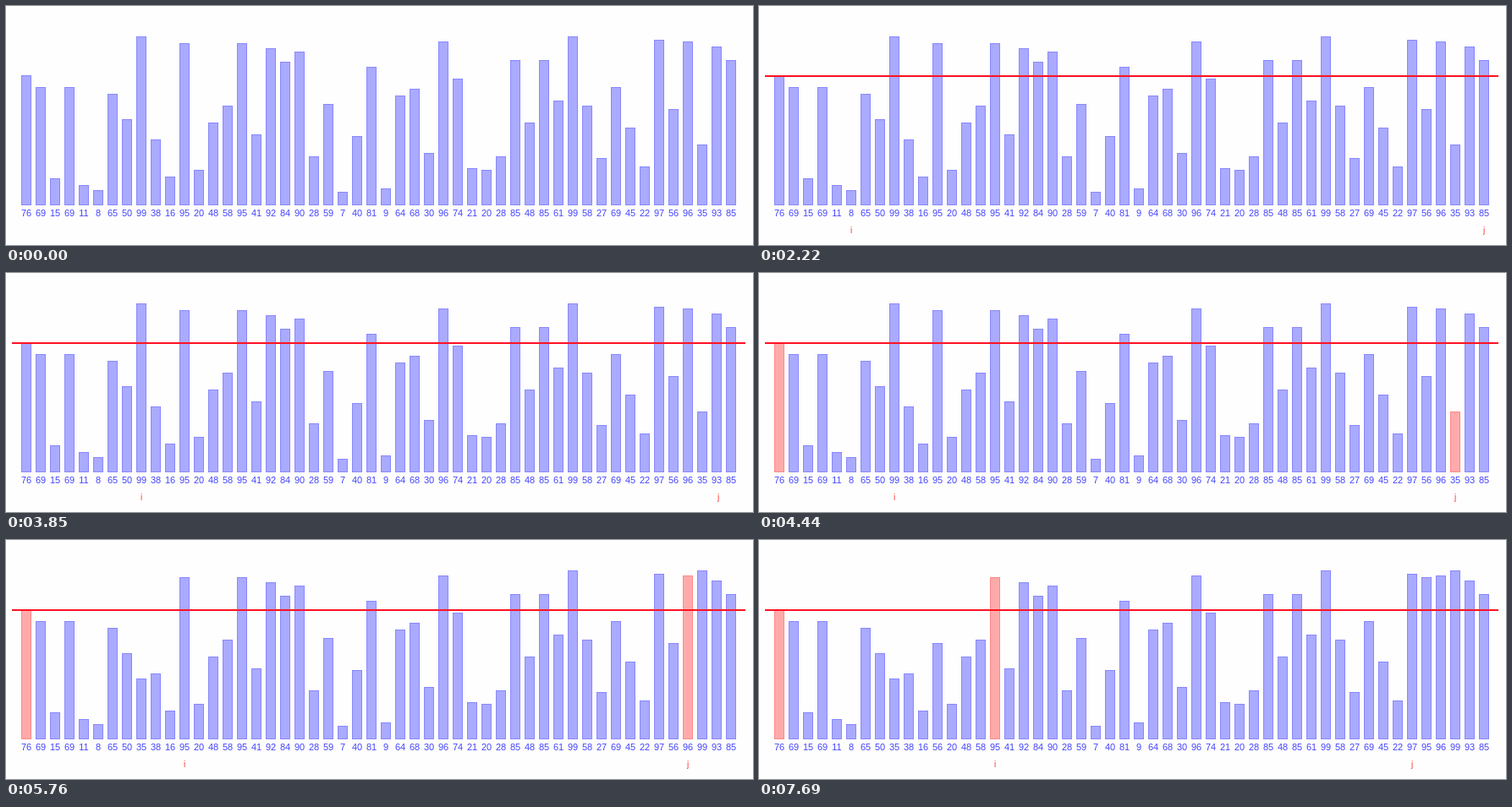
Animation, 883 px wide and 283 px high, one loop 7990 ms. Source, as an HTML page with a canvas:

```html
<!DOCTYPE html>
<html lang="en">
<head>
<meta charset="utf-8">
<title>Partition step</title>
<style>
  html, body { margin: 0; width: 100%; height: 100%; overflow: hidden; background: #fefefe; }
  canvas { display: block; }
</style>
</head>
<body>
<canvas width="883" height="283"></canvas>
<script>
const LOOP = 7990, INTRO = 450, HOLD = 175;
const PITCH = 17, FIRST_X = 24, BASE_Y = 236;
const BLUE = ['#aaaaff', '#8888ff'], PINK = ['#ffaaaa', '#ff8888'];
const OFFSTAGE = -FIRST_X / PITCH;

const values = [
  76, 69, 15, 69, 11, 8, 65, 50, 99, 38, 16, 95, 20, 48, 58, 95, 41, 92, 84, 90,
  28, 59, 7, 40, 81, 9, 64, 68, 30, 96, 74, 21, 20, 28, 85, 48, 85, 61, 99, 58,
  27, 69, 45, 22, 97, 56, 96, 35, 93, 85
];

// Comparisons with the pivot: start time, compared marker, slot of that marker.
const compares = [
  [714, 'i', 1], [1092, 'i', 2], [1470, 'i', 3], [1848, 'i', 4], [2226, 'i', 5],
  [2604, 'i', 6], [2982, 'i', 7], [3360, 'i', 8], [3533, 'j', 49], [3915, 'j', 48],
  [4300, 'j', 47], [4720, 'i', 9], [5098, 'i', 10], [5476, 'i', 11], [5650, 'j', 46],
  [6030, 'j', 45], [6490, 'i', 12], [6875, 'i', 13], [7270, 'i', 14], [7672, 'i', 15]
];

// A return from j to i means a swap, after which j also moves one slot left.
const steps = [{ start: INTRO - HOLD, i: OFFSTAGE, j: OFFSTAGE, order: values.map((_, k) => k) }];
let last = { i: 1, j: 49, active: 'i' };
for (const [start, active, slot] of compares) {
  const step = { start, active, i: last.i, j: last.j, order: steps.at(-1).order };
  if (last.active === 'j' && active === 'i') {
    step.order = step.order.slice();
    [step.order[last.i], step.order[last.j]] = [step.order[last.j], step.order[last.i]];
    step.j--;
  }
  step[active] = slot;
  steps.push(step);
  last = step;
}
// Slot of every bar, by its first position.
for (const step of steps) {
  step.slots = [];
  step.order.forEach((bar, slot) => step.slots[bar] = slot);
}

const ctx = document.querySelector('canvas').getContext('2d');
const slotX = slot => FIRST_X + PITCH * slot;
const mix = (a, b, p) => a + (b - a) * p;
const ease = p => p < 0.5 ? 4 * p ** 3 : 1 - 4 * (1 - p) ** 3;

function drawText(text, x, y, size, color) {
  ctx.font = `${size}px "Liberation Sans", Arial, sans-serif`;
  ctx.fillStyle = color;
  ctx.fillText(text, x, y);
}

function drawBar(value, slot, [fill, stroke]) {
  const x = slotX(slot), height = 2 * value + 2;
  ctx.fillStyle = fill;
  ctx.fillRect(x - 6, BASE_Y - height, 12, height);
  ctx.strokeStyle = stroke;
  ctx.strokeRect(x - 5.5, BASE_Y - height + 0.5, 11, height - 1);
  drawText(value, x, 249, 11, '#4444ff');
}

function draw(t) {
  const n = steps.findLastIndex((s, k) => k === 0 || s.start <= t);
  const now = steps[n], next = steps[n + 1] || now;
  const moveStart = now.start + HOLD;
  const holding = next === now || t < moveStart;
  const p = holding ? 0 : ease((t - moveStart) / (next.start - moveStart));
  const lit = holding && now.active ? now[now.active] : -1;

  ctx.fillStyle = '#fefefe';
  ctx.fillRect(0, 0, 883, 283);
  ctx.textAlign = 'center';
  ctx.lineWidth = 1;
  values.forEach((value, bar) => {
    const slot = mix(now.slots[bar], next.slots[bar], p);
    const isLit = lit >= 0 && (slot === 0 || slot === lit);
    drawBar(value, slot, isLit ? PINK : BLUE);
  });

  if (t < INTRO) return;
  ctx.fillStyle = '#ff1122';
  ctx.fillRect(7, 82, 867, 2);
  for (const name of ['i', 'j']) {
    drawText(name, slotX(mix(now[name], next[name], p)), 269, 10, '#ff3333');
  }
}

const origin = performance.now();
function tick() {
  draw((performance.now() - origin) % LOOP);
  requestAnimationFrame(tick);
}
tick();
</script>
</body>
</html>
```
